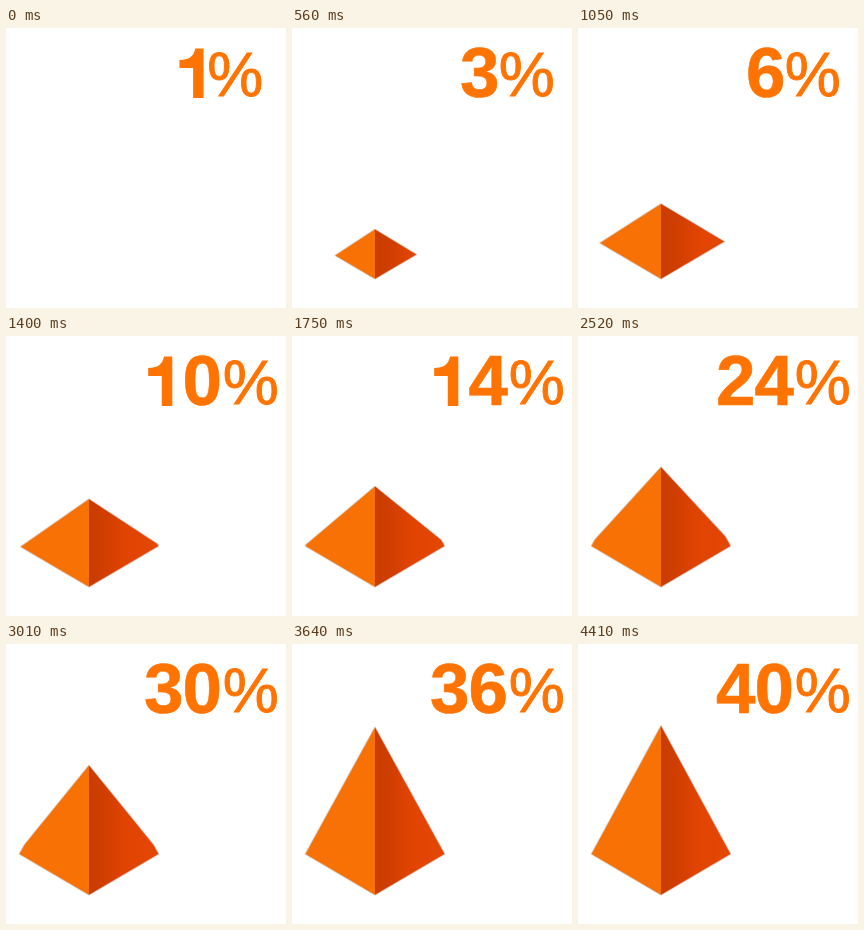
Write an HTML page that moves like this. It is 280 px wide and 280 px high and loops after 7140 ms.

```html
<!DOCTYPE html>
<html lang="en">
<head>
<meta charset="utf-8">
<title>Pyramid counter</title>
<style>
  html, body { margin: 0; width: 100%; height: 100%; overflow: hidden; background: #fff; }
  svg { display: block; width: 100vw; height: 100vh; }
  text { font-family: "Liberation Sans", Arial, sans-serif; fill: #ff7300; stroke: #ff7300; }
  .digit { font-size: 71px; font-weight: bold; stroke-width: .6px; }
  #percent { font-size: 63px; stroke-width: .9px; }
  .one { fill: #ff7300; }
</style>
</head>
<body>
<svg viewBox="0 0 280 280">
  <defs>
    <linearGradient id="shade" gradientUnits="userSpaceOnUse" x1="83" x2="152" y1="0" y2="0">
      <stop offset="0" stop-color="#c93c00"/>
      <stop offset=".22" stop-color="#d03e01"/>
      <stop offset=".5" stop-color="#e04403"/>
      <stop offset="1" stop-color="#e54604"/>
    </linearGradient>
  </defs>
  <polygon id="rim" fill="none" stroke="#dccac2" stroke-width="1.6" stroke-linejoin="round"/>
  <polygon id="left" fill="#f87104"/>
  <polygon id="right" fill="url(#shade)"/>
  <g id="tens"><text class="digit" y="69.4"></text><path class="one"/></g>
  <g id="ones"><text class="digit" y="69.4"></text><path class="one"/></g>
  <text id="percent" y="68.2">%</text>
</svg>
<script>
const LOOP = 7140, STEP = 70;
const MID = 83, BOTTOM = 250.7, HALF = 69.4, CORNER = 210, PEAK = 82;
const $ = id => document.getElementById(id);

const COUNT = [[0, 1], [1050, 6], [1750, 14], [2100, 19], [3010, 30], [3640, 36],
               [3710, 37], [3850, 38], [3990, 39], [4410, 40]];
const APEX = [[1050, 176], [1750, 150.5], [2100, 139.5], [3010, 121.5], [3640, 83.5], [3710, PEAK]];
const LEFT_BEND = [[1500, 210], [2310, 205], [3010, 201], [3640, 199]];
const RIGHT_BEND = [[1500, 208], [1750, 204], [2100, 200], [3010, 201], [3640, 199]];

function along(keys, t) {
  if (t <= keys[0][0]) return keys[0][1];
  for (let i = 1; i < keys.length; i++) {
    const [t0, a] = keys[i - 1], [t1, b] = keys[i];
    if (t < t1) return a + (b - a) * (t - t0) / (t1 - t0);
  }
  return keys[keys.length - 1][1];
}

// Base corner followed by the bend on the finished pyramid's edge.
function side(dir, grow, bend) {
  const corner = [MID + dir * HALF * grow, BOTTOM - (BOTTOM - CORNER) * grow];
  if (grow < 0.985) return [corner];
  const x = MID + dir * HALF * (bend - PEAK) / (CORNER - PEAK);
  return [corner, [x, bend]];
}

function drawPyramid(t) {
  const ease = 1 - (1 - Math.min(1, t / 1620)) ** 2;
  const apex = [MID, t < 1050 ? BOTTOM - 86 * ease : along(APEX, t)];
  const bottom = [MID, BOTTOM];
  const left = side(-1, ease, along(LEFT_BEND, t));
  const right = side(1, Math.min(1, ease * 1.04), along(RIGHT_BEND, t));
  const set = (id, points) => {
    $(id).setAttribute("points", points.join(" "));
    $(id).style.display = t ? "" : "none";
  };
  set("left", [bottom, ...left, apex]);
  set("right", [bottom, ...right, apex]);
  set("rim", [bottom, ...left, apex, ...right.reverse()]);
}

// The numeral one is a footless shape; the other digits are set in type.
function drawDigit(id, digit, x) {
  const [text, one] = $(id).children;
  const isOne = digit === "1";
  text.textContent = isOne ? "" : digit;
  text.setAttribute("x", x);
  one.setAttribute("d", isOne ? "M20 20.5H28.3V70H17.8V40H4.2V32Q18 32 20 20.5Z" : "");
  one.setAttribute("transform", `translate(${x} 0)`);
}

function drawCount(n) {
  const [tens, ones] = String(n).padStart(2, " ");
  const shift = n === 1 ? 15.5 : n < 10 ? 10 : 0;
  drawDigit("tens", tens.trim(), 138);
  drawDigit("ones", ones, n === 1 ? 169.3 : n < 10 ? 168 : 176.5);
  $("percent").setAttribute("x", 216.8 - shift);
}

function render(time) {
  const t = Math.floor((time % LOOP) / STEP) * STEP;
  drawPyramid(t);
  drawCount(Math.floor(along(COUNT, t)));
}

const start = performance.now();
function tick() {
  render(performance.now() - start);
  requestAnimationFrame(tick);
}
tick();
</script>
</body>
</html>
```
